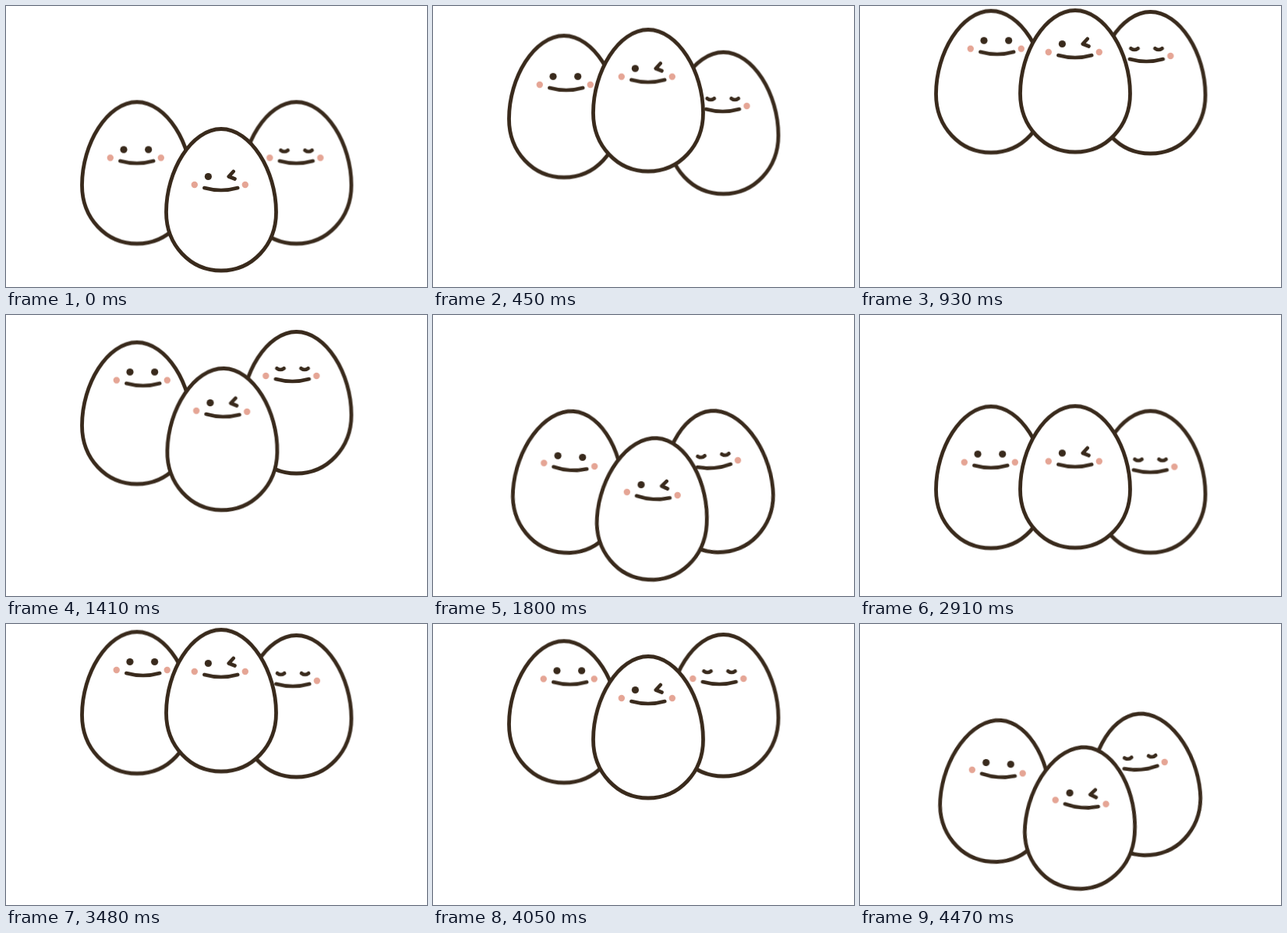
An HTML page without scripts that plays this animation: 540 by 360 pixels, repeating every 4500 ms.

```html
<!DOCTYPE html>
<html lang="en">
<head>
<meta charset="utf-8">
<title>Jumping eggs</title>
<style>
html, body { margin: 0; width: 100%; height: 100%; overflow: hidden; background: #fff; }
svg { display: block; width: 100%; height: 100%; }
.line { fill: none; stroke: #392a1c; stroke-width: 4.6; stroke-linecap: round; stroke-linejoin: round; }
.shell { fill: #fff; stroke: #392a1c; stroke-width: 4.8; }
.eye { fill: #392a1c; }
.cheek { fill: #e5a595; }

/* The eggs share one move, each 2% (90 ms) after the one before. */
.jump { animation: 4.5s cubic-bezier(.32, 0, .1, 1) infinite; }
.rock, .look { animation: 4.5s ease-in-out infinite; }
.mid .jump { animation-name: jump-mid; }
.mid .rock { animation-name: rock-mid; }
.mid .look { animation-name: look-mid; }
.left .jump { animation-name: jump-left; }
.left .rock { animation-name: rock-left; }
.left .look { animation-name: look-left; }
.right .jump { animation-name: jump-right; }
.right .rock { animation-name: rock-right; }
.right .look { animation-name: look-right; }

@keyframes jump-mid {
  0%, 36.67%, 60.6%, 97.27%, 100% { transform: translateY(0); }
  20%, 80.6% { transform: translateY(-152px); animation-timing-function: cubic-bezier(.87, 0, .72, 1); }
}
@keyframes jump-left {
  0%, 2%, 38.67%, 62.6%, 99.27%, 100% { transform: translateY(0); }
  22%, 82.6% { transform: translateY(-117px); animation-timing-function: cubic-bezier(.84, 0, .72, 1); }
}
/* The loop cuts off just before the right egg lands again. */
@keyframes jump-right {
  0%, 4%, 40.67%, 64.6% { transform: translateY(0); }
  24% { transform: translateY(-117px); animation-timing-function: cubic-bezier(.84, 0, .72, 1); }
  84.6% { transform: translateY(-117px); animation-timing-function: cubic-bezier(.816, 0, .793, .833); }
  100% { transform: translateY(-3.3px); }
}

@keyframes rock-mid {
  0%, 29%, 57%, 89.6% { transform: rotate(0deg); }
  36.5% { transform: rotate(5.2deg); }
  48% { transform: rotate(-3deg); }
  97.1% { transform: rotate(5.2deg); animation-timing-function: ease-in; }
  100% { transform: rotate(4.2deg); }
}
@keyframes rock-left {
  0%, 32%, 59%, 92.6% { transform: rotate(0deg); }
  38.5%, 99.1%, 100% { transform: rotate(4deg); }
  50% { transform: rotate(-2.4deg); }
}
@keyframes rock-right {
  0%, 33%, 60.5%, 93.6% { transform: rotate(0deg); }
  40.5% { transform: rotate(-5.2deg); }
  52% { transform: rotate(3deg); }
  100% { transform: rotate(-5deg); }
}

/* Faces slide up the shell while in the air. */
@keyframes look-mid {
  0%, 2%, 41%, 62.6% { transform: translate(0, 0); }
  16%, 29%, 76.6%, 89.6% { transform: translate(0, -18px); }
  100% { transform: translate(0, -1px); }
}
@keyframes look-left {
  0%, 4%, 43%, 64.6% { transform: translate(0, 0); }
  18%, 31%, 78.6%, 91.6% { transform: translate(8px, -23px); }
  100% { transform: translate(1.8px, -5.5px); }
}
@keyframes look-right {
  0%, 6%, 45%, 66.6% { transform: translate(0, 0); }
  20%, 33%, 80.6% { transform: translate(-5px, -15px); }
  93.6% { transform: translate(-5px, -15px); animation-timing-function: ease-in; }
  100% { transform: translate(-2px, -5.5px); }
}
</style>
</head>
<body>
<svg viewBox="0 0 540 360">
  <defs>
    <path id="shell" class="shell" d="M0 0C-40 0-70.5-33-70.5-75C-70.5-128-38-181.5 0-181.5S70.5-128 70.5-75C70.5-33 40 0 0 0Z"/>
    <g id="face">
      <circle class="cheek" cx="-34.2" cy="-110" r="4.2"/>
      <circle class="cheek" cx="30.8" cy="-110" r="4.2"/>
      <path class="line" d="M-21.7-106Q0-100 21.3-106"/>
    </g>
  </defs>

  <g class="left" transform="translate(168 304.5)">
    <g class="jump"><g class="rock">
      <use href="#shell"/>
      <g class="look">
        <use href="#face"/>
        <circle class="eye" cx="-17" cy="-120.5" r="4.6"/>
        <circle class="eye" cx="14.7" cy="-120.5" r="4.6"/>
      </g>
    </g></g>
  </g>

  <g class="right" transform="translate(372.5 304.5)">
    <g class="jump"><g class="rock">
      <use href="#shell"/>
      <g class="look">
        <use href="#face"/>
        <path class="line" d="M-20-119.7Q-15.5-116.3-11-119.7M11-119.7Q15.5-116.3 20-119.7"/>
      </g>
    </g></g>
  </g>

  <g class="mid" transform="translate(276 339)">
    <g class="jump"><g class="rock">
      <use href="#shell"/>
      <g class="look">
        <use href="#face"/>
        <circle class="eye" cx="-16.6" cy="-120.5" r="4.6"/>
        <path class="line" d="M15.7-127L9.7-120.5L17.5-117.5"/>
      </g>
    </g></g>
  </g>
</svg>
</body>
</html>
```
